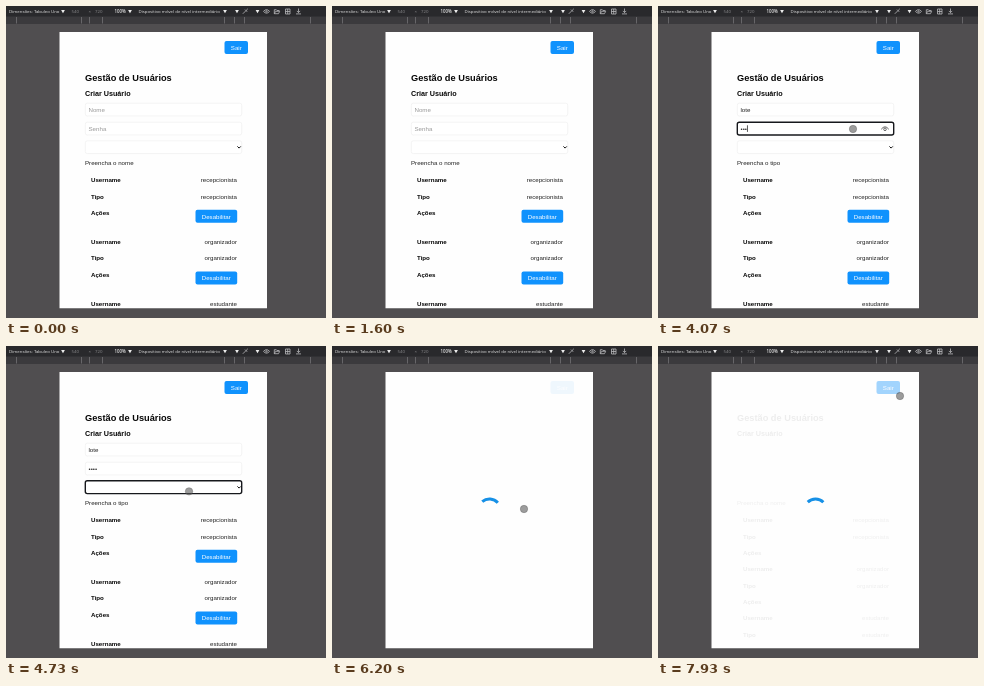
An HTML page that plays this animation: 320x312 px, repeating every 8000 ms.

```html
<!DOCTYPE html>
<html lang="pt">
<head>
<meta charset="utf-8">
<title>Gestão de Usuários</title>
<style>
  html, body { margin: 0; width: 100%; height: 100%; overflow: hidden; background: #504e50; }
  svg { display: block; width: 320px; height: 312px; }
  text { font: 6.16px "Liberation Sans", Arial, sans-serif; fill: #222; white-space: pre; }
  .b { font-weight: 700; fill: #080808; }
  .end { text-anchor: end; }
  .mid { text-anchor: middle; fill: #fff; }
  .hint { fill: #999; }
  .btn { fill: #1092fd; }
  .field { fill: #fff; stroke: #ededed; stroke-width: .6; }
  .field.on { stroke: #16181c; stroke-width: 1.4; }
  .bar text { font: 4.35px "Open Sans", "Noto Sans", sans-serif; fill: #e6e6e6; }
  .bar .dim { fill: #8b8b8d; }
  .icon { fill: none; stroke: #b9b9bb; stroke-width: .8; }
</style>
</head>
<body>
<svg viewBox="0 0 320 312" xmlns="http://www.w3.org/2000/svg">
  <defs><clipPath id="view"><rect x="53.5" y="26" width="207.5" height="276.3"/></clipPath></defs>
  <rect width="320" height="312" fill="#504e50"/>
  <g class="bar" id="bar">
    <rect width="320" height="11" fill="#29292c"/>
    <rect y="10.5" width="320" height="7.5" fill="#3b3a3d"/>
    <text x="3" y="7">Dimensões: Tabuleo Uno</text>
    <text x="65.5" y="7" class="dim">540</text>
    <text x="82.5" y="7" class="dim">×</text>
    <text x="89" y="7" class="dim">720</text>
    <text x="108.5" y="7" style="font-weight:600">100%</text>
    <text x="132.5" y="7">Dispositivo móvel de nível intermediário</text>
    <g class="icon">
      <path d="M236.8 7.8l3.3-3.3M239 3.6l2.2 2.2M240.2 4.4l1.6-1.6"/>
      <path d="M257.5 5.4q3-3.6 6 0q-3 3.6-6 0z"/><circle cx="260.5" cy="5.4" r=".7"/>
      <path d="M268.3 7.7v-4h2l.7.8h2.4M268.3 7.7h4.2l1.2-2.4h-4z"/>
      <path d="M279.5 3h4.5v5h-4.5zM281.7 3v5M279.5 5.5h4.5"/>
      <path d="M292.5 2.5v4M290.8 4.9l1.7 1.7 1.7-1.7M290 7.9h5"/>
    </g>
  </g>
  <g clip-path="url(#view)">
    <rect x="53" y="26" width="209" height="277" fill="#fefefe"/>
    <g id="sair">
      <rect class="btn" x="218.5" y="35" width="23.5" height="13" rx="2"/>
      <text class="mid" x="230.3" y="43.7">Sair</text>
    </g>
    <g id="body">
      <text class="b" x="79" y="74.8" style="font-size:9.24px">Gestão de Usuários</text>
      <text class="b" x="79" y="89.6" style="font-size:7.2px">Criar Usuário</text>
      <g id="form">
        <rect class="field" x="79.3" y="97.2" width="156.4" height="12.8" rx="2"/>
        <rect class="field" x="79.3" y="116.2" width="156.4" height="12.8" rx="2"/>
        <rect class="field" x="79.3" y="134.8" width="156.4" height="12.8" rx="2"/>
        <text id="name" x="82.5" y="105.7"></text>
        <text id="pass" x="82.5" y="124.7"></text>
        <text id="kind" x="85" y="143.3"></text>
        <path d="M231.4 140.4l1.7 1.7 1.7-1.7" fill="none" stroke="#111" stroke-width="1"/>
        <g id="eye" fill="none" stroke="#444" stroke-width=".8">
          <path d="M223.2 123.3q3.8-5 7.6 0"/><circle cx="227" cy="123.3" r="1.3"/>
        </g>
        <rect id="caret" width=".7" height="6.6" fill="#111"/>
      </g>
      <text id="note" x="79" y="158.6"></text>
      <g id="add">
        <rect class="btn" x="79" y="153.2" width="157" height="13" rx="2"/>
        <text class="mid" x="157.3" y="161.9">Novo Usuário</text>
      </g>
      <g id="list"></g>
    </g>
    <path id="spin" d="M149.7 156.2A11 11 0 0 1 165.3 156.2" fill="none" stroke="#1690e6" stroke-width="3"/>
  </g>
  <circle id="dot" r="3.7" fill="#555" fill-opacity=".58" stroke="#555" stroke-opacity=".5" stroke-width=".7"/>
</svg>
<script>
const LOOP = 8000;
const $ = id => document.getElementById(id);
const show = (el, on) => el.style.display = on ? '' : 'none';

function add(parent, tag, attrs, text = '') {
  const el = document.createElementNS('http://www.w3.org/2000/svg', tag);
  for (const k in attrs) el.setAttribute(k, attrs[k]);
  el.textContent = text;
  parent.append(el);
  return el;
}

for (const x of [57, 124, 219, 231, 251.5])
  add($('bar'), 'path', { d: `M${x - 1.9} 4h3.8l-1.9 3.3z`, fill: '#ececec' });
for (const x of [10, 75, 83, 96, 218, 228, 238, 304])
  add($('bar'), 'rect', { x, y: 11, width: .8, height: 6.5, fill: '#737275' });

// User cards
const rows = [], actions = [];
['recepcionista', 'organizador', 'estudante'].forEach((user, i) => {
  ['Username', 'Tipo', 'Ações'].forEach((label, j) => {
    const g = add($('list'), 'g', {});
    add(g, 'text', { class: 'b', x: 85, y: 2.2 }, label);
    if (j < 2) add(g, 'text', { class: 'end', x: 231, y: 2.2 }, user);
    else {
      const act = add(g, 'g', {});
      add(act, 'rect', { class: 'btn', x: 189.5, y: -3, width: 41.7, height: 13, rx: 2 });
      add(act, 'text', { class: 'mid', x: 210.3, y: 5.7 }, 'Desabilitar');
      actions.push(act);
    }
    rows.push({ g, full: 174 + 61.7 * i + 16.4 * j, bare: 174 + 16.35 * (3 * i + j) });
  });
});

// Pointer stops: time, x, y
const path = [
  [1870, 298, 120], [2400, 206, 107], [2600, 199, 109], [3380, 199, 109],
  [3600, 195, 123], [4200, 195, 123], [4420, 188, 141], [4640, 188, 141],
  [4950, 164, 162], [5350, 164, 162], [5850, 192, 163], [6600, 192, 163],
  [7350, 234, 43], [7700, 236, 43], [7930, 242, 50], [LOOP, 242, 50]
];
// Opacity steps: time, content, exit button
const fades = [
  [0, 1, 1], [6070, .3, .5], [6130, .08, .25], [6200, 0, .06],
  [6600, .3, .5], [6670, 1, 1], [7870, .25, .6], [7930, .065, .38]
];
const nameKeys = [2930, 3060, 3180, 3310];
const passKeys = [3780, 3910, 4030, 4140];
const last = (list, t) => list.filter(s => s[0] <= t).pop();
const typed = (keys, t) => keys.filter(k => k <= t).length;
const fields = document.querySelectorAll('.field');

function pointer(t) {
  const i = path.findIndex(p => p[0] > t);
  if (i < 1) return null;
  const [t0, x0, y0] = path[i - 1], [t1, x1, y1] = path[i];
  const u = (t - t0) / (t1 - t0), e = u * u * (3 - 2 * u);
  return [x0 + (x1 - x0) * e, y0 + (y1 - y0) * e];
}

function label(el, value, hint) {
  el.textContent = value || hint;
  el.classList.toggle('hint', !value);
}

function render(t) {
  const fresh = t >= 6200;
  const n = fresh ? 0 : typed(nameKeys, t), p = fresh ? 0 : typed(passKeys, t);
  const chosen = !fresh && t >= 4760;
  const focus = fresh || t < 2600 ? -1 : t < 3580 ? 0 : t < 4440 ? 1 : t < 6070 ? 2 : -1;
  const bare = t >= 7870;

  label($('name'), 'lote'.slice(0, n), 'Nome');
  label($('pass'), '•'.repeat(p), 'Senha');
  $('kind').textContent = chosen ? 'Organizador' : '';
  $('note').textContent = !n ? 'Preencha o nome' : !p ? 'Preencha a senha' : 'Preencha o tipo';
  fields.forEach((f, i) => f.classList.toggle('on', i === focus));
  show($('note'), !chosen);
  show($('add'), chosen);
  show($('form'), !bare);
  show($('eye'), focus === 1 && p);

  const typing = focus === 0 || focus === 1;
  const since = t - Math.max(focus ? 3580 : 2600, ...(focus ? passKeys : nameKeys).filter(k => k <= t));
  show($('caret'), typing && since % 1000 < 500);
  if (typing) {
    const el = focus ? $('pass') : $('name'), w = (focus ? p : n) ? el.getComputedTextLength() : 0;
    $('caret').setAttribute('x', 82.5 + w);
    $('caret').setAttribute('y', focus ? 119.3 : 100.3);
  }

  const shift = chosen ? 6.3 : 0;
  for (const r of rows) r.g.setAttribute('transform', `translate(0 ${(bare ? r.bare : r.full) + shift})`);
  for (const a of actions) show(a, !bare);

  const [, content, exit] = last(fades, t);
  $('body').style.opacity = content;
  $('sair').style.opacity = exit;

  const start = t >= 7870 ? 7930 : 6190;
  show($('spin'), t >= 7870 || (t >= 6130 && t < 6670));
  $('spin').setAttribute('transform', `rotate(${(t - start) * .36} 157.5 164)`);

  const at = pointer(t);
  show($('dot'), at);
  if (at) $('dot').setAttribute('transform', `translate(${at})`);
}

function tick() {
  render(performance.now() % LOOP);
  requestAnimationFrame(tick);
}
tick();
</script>
</body>
</html>
```
